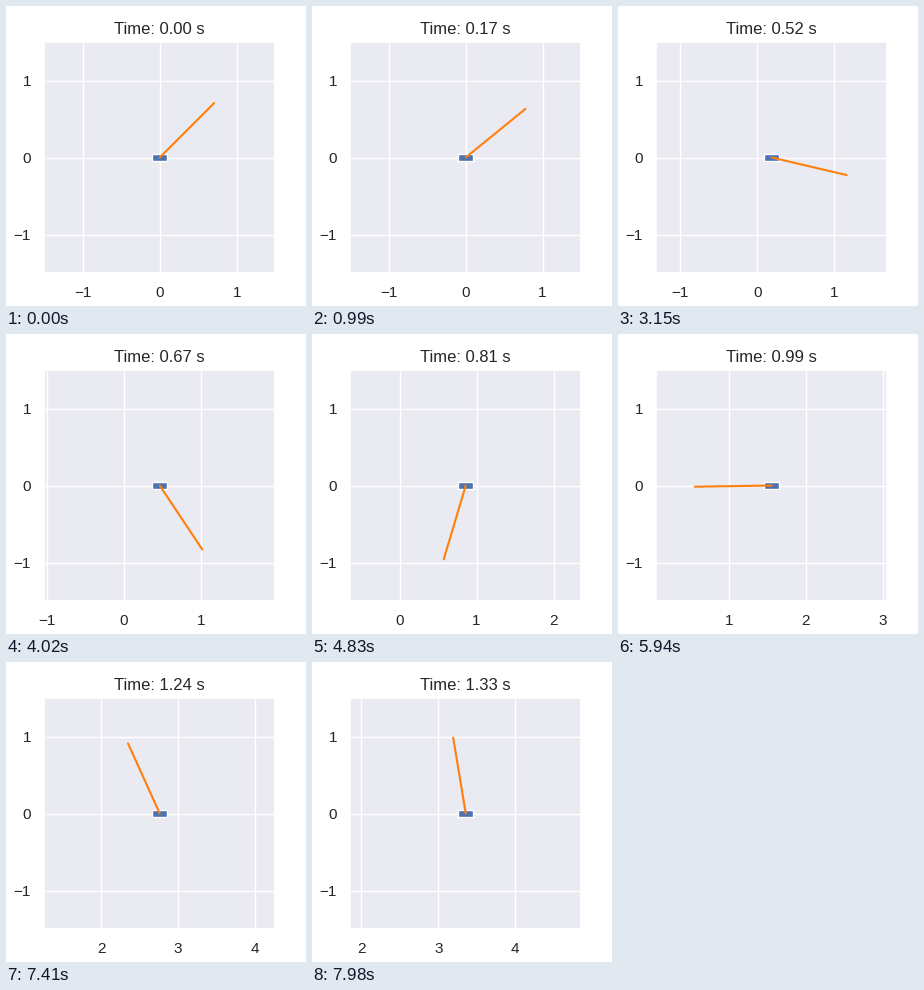
Recreate the animation shown at these times as a matplotlib script. Size 300 px wide and 300 px high, loop 8000 ms.

```python
import numpy as np
import matplotlib.pyplot as plt
from matplotlib.animation import FuncAnimation
from matplotlib.patches import Rectangle
from matplotlib.ticker import MultipleLocator

LOOP = 8000
FRAMES = 267
DT = 0.005
INK = "#262626"

# Key poses: time, cart position, pole angle clockwise from upright
KEY_T = np.array([0, 0.315, 0.525, 0.805, 0.99, 1.14, 1.33])
CART = np.array([0, 0.03, 0.189, 0.86, 1.56, 2.24, 3.357])
POLE = np.radians([45, 65.6, 103.2, 196.6, 269.1, 315, 350.6])


def slopes(t, y, v_end):
    """Knot velocities of a cubic spline that starts at rest."""
    h = np.diff(t)
    s = np.diff(y) / h
    n = len(t)
    a = np.eye(n)
    b = np.zeros(n)
    b[-1] = v_end
    for i in range(1, n - 1):
        a[i, i - 1] = 1 / h[i - 1]
        a[i, i] = 2 * (1 / h[i - 1] + 1 / h[i])
        a[i, i + 1] = 1 / h[i]
        b[i] = 3 * (s[i - 1] / h[i - 1] + s[i] / h[i])
    return np.linalg.solve(a, b)


def hermite(t, y, v, at):
    i = np.clip(np.searchsorted(t, at, side="right") - 1, 0, len(t) - 2)
    h = t[i + 1] - t[i]
    u = (at - t[i]) / h
    return ((2 * u**3 - 3 * u**2 + 1) * y[i] + (u**3 - 2 * u**2 + u) * h * v[i]
            + (3 * u**2 - 2 * u**3) * y[i + 1] + (u**3 - u**2) * h * v[i + 1])


times = DT * np.arange(FRAMES)
cart_x = hermite(KEY_T, CART, slopes(KEY_T, CART, 6.65), times)
pole_a = hermite(KEY_T, POLE, slopes(KEY_T, POLE, 2.3), times)

plt.rcParams["font.family"] = "Liberation Sans"
fig = plt.figure(figsize=(3, 3), dpi=100, facecolor="white")
ax = fig.add_subplot(facecolor="#EAEAF2")
ax.set_aspect("equal")
ax.set_ylim(-1.5, 1.5)
ax.set_axisbelow(True)
ax.grid(color="white", linewidth=1, linestyle="-")
ax.tick_params(length=0, pad=9.5, labelsize=11, labelcolor=INK)
for axis in (ax.xaxis, ax.yaxis):
    axis.set_major_locator(MultipleLocator(1))
for spine in ax.spines.values():
    spine.set(color="white", linewidth=1.25)

title = ax.set_title("", fontsize=12, color=INK, pad=6)
cart = ax.add_patch(Rectangle((-0.1, -0.05), 0.2, 0.1, facecolor="#4C72B0",
                              edgecolor="white", linewidth=1))
pole, = ax.plot([], [], color="tab:orange", linewidth=1.5,
                solid_capstyle="round")


def draw(n):
    x, a = cart_x[n], pole_a[n]
    ax.set_xlim(x - 1.5, x + 1.5)
    cart.set_x(x - 0.1)
    pole.set_data([x, x + np.sin(a)], [0, np.cos(a)])
    # The clock runs in single precision, which decides how halves round
    title.set_text(f"Time: {float(np.float32(times[n])):.2f} s")
    return cart, pole, title


anim = FuncAnimation(fig, draw, frames=FRAMES, init_func=lambda: draw(0),
                     interval=LOOP / FRAMES, repeat=True, repeat_delay=0)
plt.show()
```
